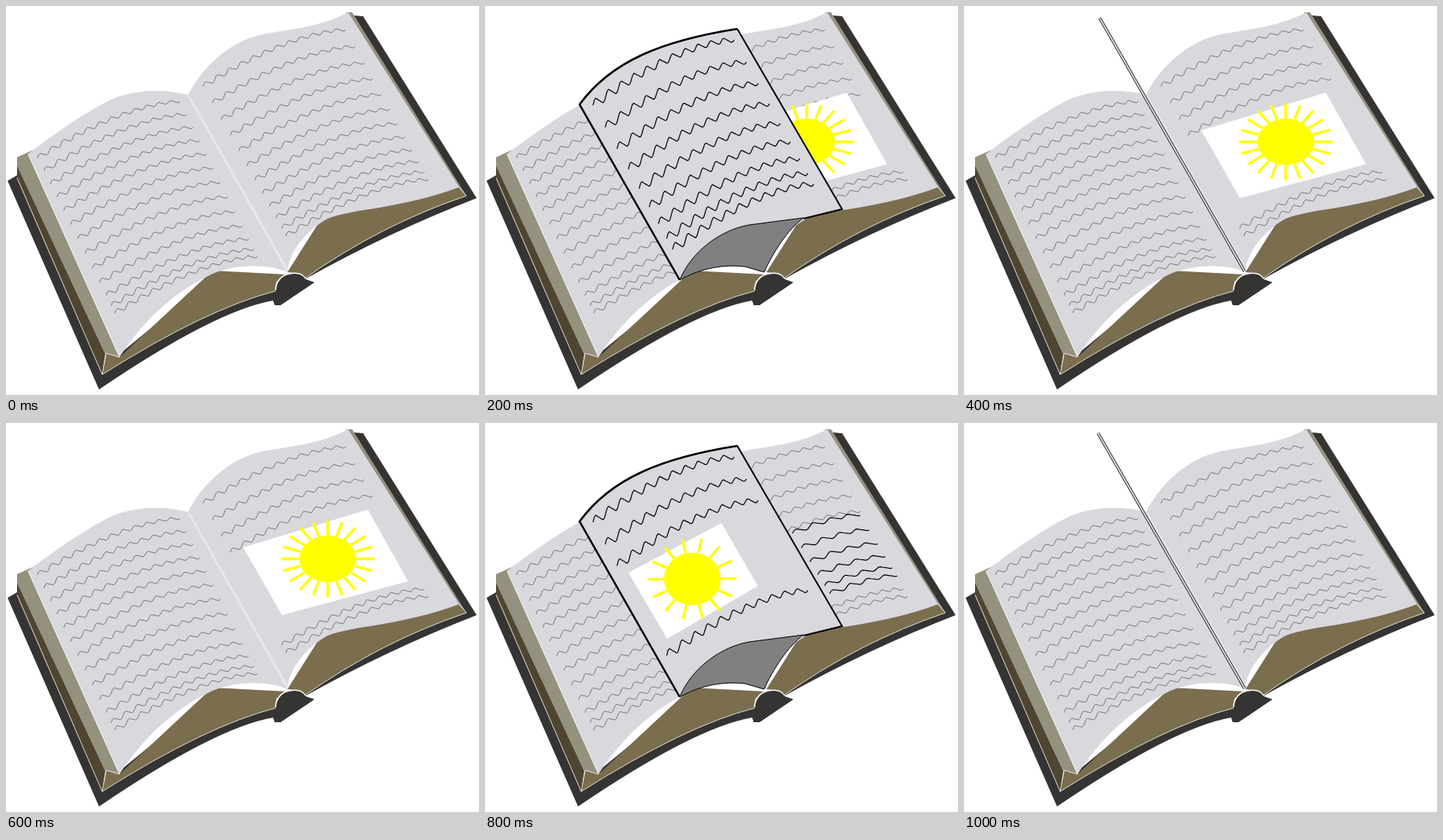
Recreate the animation shown at these times as an HTML page with a canvas. Size 600 by 494 pixels, loop 1200 ms.

```html
<!DOCTYPE html>
<html lang="en">
<head>
<meta charset="utf-8">
<title>Turning pages</title>
<style>
html, body { margin: 0; width: 100%; height: 100%; overflow: hidden; background: #fff; }
canvas { display: block; }
</style>
</head>
<body>
<canvas id="stage" width="600" height="494"></canvas>
<script>
const ctx = document.getElementById('stage').getContext('2d');
const PAPER = '#d9d8dd', COVER = '#363333', EDGE = '#95917f', BLOCK = '#7a6e4e';

function fill(d, color) {
  ctx.fillStyle = color;
  ctx.fill(new Path2D(d));
}

function stroke(d, width, color = '#000') {
  ctx.strokeStyle = color;
  ctx.lineWidth = width;
  ctx.stroke(new Path2D(d));
}

// Rows of writing start on a straight margin, closer together towards its foot.
const tighten = t => 1 - (1 - t) ** 1.25;
const swell = t => t + 0.055 * Math.sin(Math.PI * t ** 3);

function rows(x0, y0, x1, y1, count, ease = tighten) {
  return Array.from({ length: count }, (_, i) => {
    const k = ease(i / (count - 1));
    return [x0 + (x1 - x0) * k, y0 + (y1 - y0) * k];
  });
}

const leftRows = rows(40, 193, 138, 390, 13, swell);
const rightRows = rows(250, 102, 355, 292, 12);
const leafRows = rows(137, 126, 238, 309, 9);
const shortRows = rows(390, 140, 437, 217, 6);

const FINE = { w: 181, rise: 72, waves: 12, amp: 3.8, line: 0.8, color: '#5c5c60' };
const BOLD = { w: 179, rise: 83, waves: 11, amp: 6.5, line: 1.2, color: '#000' };
const SHORT = { w: 88, rise: 24, waves: 4, amp: 3.5, line: 1.2, color: '#000' };

// Wavy lines that follow the bend of the paper.
function write(starts, { w, rise, waves, amp, line, color }) {
  ctx.strokeStyle = color;
  ctx.lineWidth = line;
  ctx.beginPath();
  for (const [x, y] of starts) {
    ctx.moveTo(x, y);
    for (let u = 0; u <= 1; u += 0.1 / waves) {
      const a = u * waves * 2 * Math.PI;
      const climb = rise * (1 - (1 - u) ** 1.6);
      const wave = amp * (1 - 0.55 * u) * Math.sin(a + 0.5 * Math.sin(a));
      ctx.lineTo(x + u * w, y - climb - wave);
    }
  }
  ctx.stroke();
}

function book() {
  fill('M2 222 L14 215 L122 460 L262 345 L342 355 L380 340 L575 230 L441 12 L453 13 L597 244 ' +
    'Q484 288 379 347 L391 351 L348 380 L341 380 L339 374 Q265 387 118 487 Z', COVER);
  fill('M14 202 L126 442 L122 468 L14 222 Z', '#4f4632');
  fill('M14 192 L43 179 L28 188 L144 446 L126 442 L14 203 Z', EDGE);
  fill('M127 441 L144 446 L262 336 L357 341 L343 350 L342 362 Q255 384 122 468 Z', BLOCK);
  fill('M357 338 L405 262 L575 230 L584 241 Q475 278 379 346 L374 340 Z', BLOCK);
  fill('M431 8 L439 8 L584 241 L574 231 Z', EDGE);

  fill('M28 188 C70 155 115 127 135 118 C165 106 200 105 231 113 L357 338 ' +
    'C335 328 295 327 262 340 C225 357 180 390 144 446 Z', PAPER);
  fill('M231 113 C249 77 284 45 325 36 C365 29 400 26 434 8 L575 230 ' +
    'C500 258 440 257 408 270 C378 287 358 315 357 338 Z', PAPER);
  fill('M229 112 L235 117 L357 332 L356 338 Z', '#e7e6ea');

  stroke('M14 218 L122 468 Q255 384 342 362 M28 188 L144 446 L127 441 L122 468', 0.8, '#fff');
  stroke('M575 230 L584 241 Q475 278 379 346', 0.8, '#fff');
  fill('M342 358 C344 346 354 340 366 339 Q379 339 380 347 L391 351 L348 380 L341 380 L339 374 L344 368 Z', COVER);
  stroke('M342 361 C342 349 351 341 360 340 Q374 337 380 346', 1.5, '#fff');
}

function sun(frame, cx, cy, rx, ry, rays, turn, reach) {
  fill(frame, '#fff');
  ctx.strokeStyle = ctx.fillStyle = '#ff0';
  ctx.lineWidth = 3.3;
  ctx.beginPath();
  for (let i = 0; i < rays; i++) {
    const a = turn + i / rays * 2 * Math.PI;
    const dx = rx * Math.cos(a), dy = ry * Math.sin(a);
    ctx.moveTo(cx + dx, cy + dy);
    ctx.lineTo(cx + dx * reach, cy + dy * reach);
  }
  ctx.stroke();
  ctx.beginPath();
  ctx.ellipse(cx, cy, rx, ry, 0, 0, 2 * Math.PI);
  ctx.fill();
}

const rightSun = () => sun('M301 158 L459 110 L510 201 L350 244 Z', 408, 172.5, 36, 29.5, 20, -Math.PI / 2, 1.65);
const leafSun = () => sun('M182 190 L300 127 L346 207 L231 274 Z', 263, 198, 36, 33.5, 14, -1.36, 1.55);

// The page halfway through its turn.
function leaf() {
  const under = 'M247 348 C262 311 300 284 335 278 L404 269 C384 284 366 312 354 338 L330 331 C305 328 275 332 247 348 Z';
  fill('M120 125 C160 70 225 44 320 29 L453 258 L404 270 L335 278 C300 284 262 311 247 348 Z', PAPER);
  fill(under, '#808080');
  stroke(under, 1);
  stroke('M320 29 L453 258 L404 270', 2);
  stroke('M247 348 L120 125 C160 70 225 44 320 29', 2.5);
}

// The page seen edge-on.
function edge(x, y) {
  const d = `M${x} ${y} L356 337`;
  stroke(d, 3.6, '#222');
  stroke(d, 1.8, '#e2e2e4');
}

function draw(step) {
  const full = step === 0 || step === 5, turning = step === 1 || step === 4;
  ctx.clearRect(0, 0, 600, 494);
  book();
  write(leftRows, FINE);
  write(full ? rightRows : [...rightRows.slice(0, turning ? 5 : 4), ...rightRows.slice(-2)], FINE);
  if (step >= 1 && step <= 3) rightSun();
  if (step === 4) write(shortRows, SHORT);
  if (turning) leaf();
  if (step === 1) write(leafRows, BOLD);
  if (step === 4) {
    write([...leafRows.slice(0, 3), leafRows[7]], BOLD);
    leafSun();
  }
  if (step === 2) edge(172, 15);
  if (step === 5) edge(170, 13);
}

function tick() {
  draw(Math.floor(performance.now() / 200) % 6);
  requestAnimationFrame(tick);
}
tick();
</script>
</body>
</html>
```
